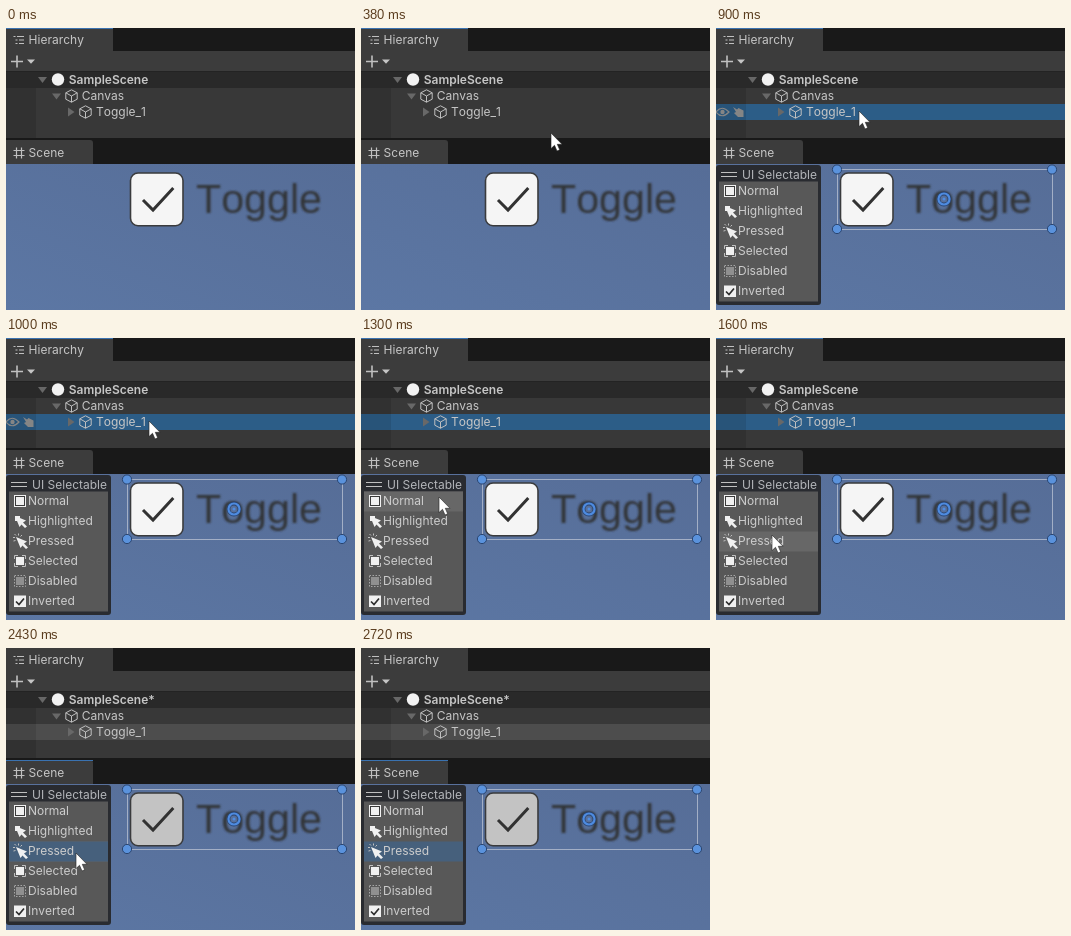
Write an HTML page that moves like this. It is 349x282 px and loops after 3630 ms.

```html
<!DOCTYPE html>
<html lang="en">
<head>
<meta charset="utf-8">
<title>Toggle state preview</title>
<style>
  html, body { margin: 0; width: 100%; height: 100%; overflow: hidden; background: #191919; }
  svg { display: block; width: 349px; height: 282px; font: 12px Inter, sans-serif; font-kerning: none; fill: #c6c6c6; }
  .line { fill: none; stroke: #c0c0c0; }
  .bold { font-weight: 600; }
  .label { font: 41.2px "Liberation Sans", Arial, sans-serif; font-kerning: none; fill: #323438; }

  /* One shared clock; every change is a hard cut. */
  .t { animation: 3630ms step-end infinite; }
  .hier-focus { animation-name: hier-focus; }
  .scene-focus, .pressed { animation-name: pressed; }
  .row-hover { animation-name: row-hover; }
  .row-on { animation-name: row-on; }
  .selected { animation-name: selected; }
  .dirty { animation-name: dirty; }
  .tip { animation-name: tip; }
  .item-hover { animation-name: item-hover; }
  .box { animation-name: box; }
  .cursor { animation-name: cursor; }

  @keyframes hier-focus { 0% { visibility: visible } 55.09%, 100% { visibility: hidden } }
  @keyframes pressed { 0% { visibility: hidden } 55.09%, 100% { visibility: visible } }
  @keyframes selected { 0% { visibility: hidden } 24.79%, 100% { visibility: visible } }
  @keyframes dirty { 0% { visibility: hidden } 58.4%, 100% { visibility: visible } }
  @keyframes row-hover {
    0% { visibility: hidden } 13.77% { visibility: visible } 30.3%, 100% { visibility: hidden }
  }
  @keyframes row-on {
    0% { visibility: hidden; fill: #2c5d87 }
    24.79% { visibility: visible; fill: #2c5d87 }
    55.09%, 100% { visibility: visible; fill: #4d4d4d }
  }
  @keyframes tip {
    0% { visibility: hidden } 55.09% { visibility: visible } 66.94%, 100% { visibility: hidden }
  }
  @keyframes item-hover {
    0% { visibility: hidden; transform: translateY(0) }
    35.81% { visibility: visible; transform: translateY(0) }
    38.56% { visibility: visible; transform: translateY(20px) }
    44.07% { visibility: visible; transform: translateY(40px) }
    69.69% { visibility: visible; transform: translateY(60px) }
    72.45%, 100% { visibility: hidden; transform: translateY(60px) }
  }
  @keyframes box { 0% { fill: #f5f5f5 } 55.09%, 100% { fill: #c3c3c3 } }
  @keyframes cursor {
    0% { transform: translate(400px, 300px) }
    5.5% { transform: translate(214px, 136px) }
    8.26% { transform: translate(190px, 105px) }
    11.01% { transform: translate(172px, 92px) }
    13.77% { transform: translate(157px, 86px) }
    16.52% { transform: translate(147px, 83px) }
    19.28% { transform: translate(143px, 83px) }
    30.3% { transform: translate(139px, 69px) }
    33.05% { transform: translate(110px, 118px) }
    35.81% { transform: translate(78px, 159px) }
    38.56% { transform: translate(67px, 179px) }
    41.32% { transform: translate(59px, 191px) }
    44.07% { transform: translate(56px, 197px) }
    66.94% { transform: translate(70px, 205px) }
    69.69% { transform: translate(97px, 222px) }
    72.45% { transform: translate(133px, 245px) }
    74.93%, 100% { transform: translate(400px, 300px) }
  }
</style>
</head>
<body>
<svg viewBox="0 0 349 282">
  <defs>
    <linearGradient id="sky" x1="1" y1="0" x2="0" y2="1">
      <stop offset="0" stop-color="#566d97"/>
      <stop offset="1" stop-color="#5c77a4"/>
    </linearGradient>
    <filter id="soft"><feGaussianBlur stdDeviation=".9"/></filter>
    <filter id="softer-edge"><feGaussianBlur stdDeviation=".45"/></filter>
    <g id="cube" class="line">
      <path d="M0-6.2 5.7-3.2V3.2L0 6.2-5.7 3.2V-3.2ZM-5.7-3.2 0 0 5.7-3.2M0 0V6.2"/>
    </g>
    <path id="fold" d="M-4.5-2.5h9L0 3.5Z" fill="#686868"/>
    <circle id="knob" r="4.6" fill="#5a92dc" stroke="#2a4570"/>
    <path id="arrow" d="M0 0 11 4.5 8 6.5 12 10.5 10 12 6.5 8.5 4.5 11Z" fill="#f0f0f0"/>
  </defs>

  <!-- Hierarchy -->
  <rect width="349" height="282" fill="#191919"/>
  <path d="M0 0H107V24H0Z" fill="#3c3c3c"/>
  <rect class="t hier-focus" width="107" height="1" fill="#3a72b0"/>
  <path class="line" d="M7.5 8.5h2M11 8.5h7M9.5 12h2M13 12h5M9.5 15.5h2M13 15.5h5"/>
  <text x="22.6" y="16">Hierarchy</text>
  <path d="M0 23H349V43H0Z" fill="#3c3c3c"/>
  <path class="line" d="M5 33.5h12M11 27.5v12" stroke-width="1.6"/>
  <path d="M21 31.5h8L25 35.7Z"/>
  <path d="M0 43H349V110H0Z" fill="#383838"/>
  <path d="M0 43H30V110H0Z" fill="#313131"/>
  <path d="M0 43H349V44H0Z" fill="#232323"/>
  <path d="M0 44H349V60H0Z" fill="#292929"/>

  <g class="t row-hover">
    <path d="M0 76H349V92H0Z" fill="#444"/>
    <path d="M0 76H30V92H0Z" fill="#3d3d3d"/>
  </g>
  <rect class="t row-on" y="76" width="349" height="16"/>
  <path class="t selected" d="M0 76H30V92H0Z" fill="#000" opacity=".1"/>
  <g class="t row-hover">
    <path d="M0 84Q6 76.5 13 84 6 91.5 0 84Z" fill="none" stroke="#858585" stroke-width="1.2"/>
    <circle cx="6.5" cy="84" r="2.2" fill="#858585"/>
    <path d="M17 79l4 2.5 1.5-1.5 5 2.5V89H22l-4-4 2-1Z" fill="#858585"/>
  </g>

  <use href="#fold" x="36.5" y="51.5"/>
  <use href="#fold" x="50.5" y="68"/>
  <path d="M62 79.5v9l6.5-4.5Z" fill="#686868"/>
  <circle cx="52" cy="51.5" r="6.2" fill="#f2f2f2"/>
  <use href="#cube" x="65.5" y="68"/>
  <use href="#cube" x="79.5" y="84"/>
  <text x="62.7" y="56" class="bold">SampleScene<tspan class="t dirty">*</tspan></text>
  <text x="75.7" y="72">Canvas</text>
  <text x="90" y="88">Toggle_1</text>

  <!-- Scene -->
  <path d="M0 136V112H84Q87 112 87 115V136Z" fill="#3c3c3c"/>
  <rect class="t scene-focus" y="112" width="87" height="1" fill="#3a72b0"/>
  <path class="line" d="M7.5 122.5h11M7.5 127.5h11M10.5 119.5v11M15.5 119.5v11" stroke-width="1.2"/>
  <text x="22.6" y="129">Scene</text>
  <path d="M0 136H349V282H0Z" fill="url(#sky)"/>
  <g filter="url(#softer-edge)">
    <rect class="t box" x="124.5" y="145" width="52.5" height="52.7" rx="7.5" stroke="#3a3b3d" stroke-width="1.6"/>
    <path d="M137 172 147 182 167.3 160" fill="none" stroke="#323232" stroke-width="3"/>
  </g>
  <text x="190" y="185" class="label" filter="url(#soft)">Toggle</text>

  <g class="t selected">
    <rect x="121.5" y="141.5" width="215" height="60" fill="none" stroke="#a3afc6"/>
    <use href="#knob" x="121" y="141.5"/>
    <use href="#knob" x="336" y="141.5"/>
    <use href="#knob" x="121" y="201"/>
    <use href="#knob" x="336" y="201"/>
    <circle cx="228" cy="171" r="5.5" fill="none" stroke="#2a4570" stroke-width="3.8"/>
    <circle cx="228" cy="171" r="5.5" fill="none" stroke="#4e8be0" stroke-width="2.2"/>
    <circle cx="228" cy="171" r="1.5" fill="#4e8be0"/>
  </g>

  <!-- Selectable panel -->
  <g class="t selected">
    <rect x="0" y="137" width="105" height="140" rx="3" fill="#292b30"/>
    <path d="M3 153.5H102V273.5H3Z" fill="#585858"/>
    <path class="line" d="M5 144.5h16M5 148.5h16" stroke="#888"/>
    <text x="26" y="150.5" fill="#b4b6ba">UI Selectable</text>
  </g>
  <rect class="t item-hover" x="3" y="153.5" width="99" height="20" fill="#676767"/>
  <rect class="t pressed" x="3" y="193.5" width="99" height="20" fill="#46607c"/>
  <g class="t selected" fill="#cdcdcd">
    <text x="22" y="167">Normal</text>
    <text x="22" y="187">Highlighted</text>
    <text x="22" y="207">Pressed</text>
    <text x="22" y="227">Selected</text>
    <text x="22" y="247">Disabled</text>
    <text x="22" y="267">Inverted</text>

    <rect x="8.5" y="157.5" width="11" height="11" fill="#3a3a3a" stroke="#f0f0f0"/>
    <path d="M10 159h8v8h-8Z" fill="#f0f0f0"/>

    <path d="M9 178h5v5h-5Z" fill="#f0f0f0"/>
    <use href="#arrow" x="9" y="178"/>

    <path d="M7.5 203l2-.5M7 199.5h2M8.5 196l1.5 1.5M12.5 195.5v2M16 197l-1.5 1.5" class="line" stroke="#f0f0f0"/>
    <use href="#arrow" x="10" y="199"/>

    <path d="M8.5 221v-3.5h3.5M16 217.5h3.5v3.5M8.5 225v3.5h3.5M16 228.5h3.5v-3.5" class="line" stroke="#f0f0f0"/>
    <path d="M10 219h8v8h-8Z" fill="#f0f0f0"/>

    <rect x="8.5" y="237.5" width="11" height="11" fill="none" stroke="#a6a6a6" stroke-dasharray="1.5 1.5"/>
    <path d="M10 239h8v8h-8Z" fill="#909090"/>

    <path d="M8 257.5h12v11.5H8Z" fill="#f0f0f0"/>
    <path d="M10 263.5l3 3 5-6" fill="none" stroke="#2c2c2c" stroke-width="1.7"/>
  </g>

  <g class="t tip">
    <rect x="22.5" y="224.5" width="56" height="24" fill="#333" stroke="#1e1e1e"/>
    <text x="28" y="241">Pressed</text>
  </g>

  <g class="t cursor">
    <path d="M0 0V15.6L3.5 12.3 6 18 8.7 16.8 6.3 11.3H11Z" fill="#fff" stroke="#222" stroke-width=".6" stroke-linejoin="round"/>
  </g>
</svg>
</body>
</html>
```
